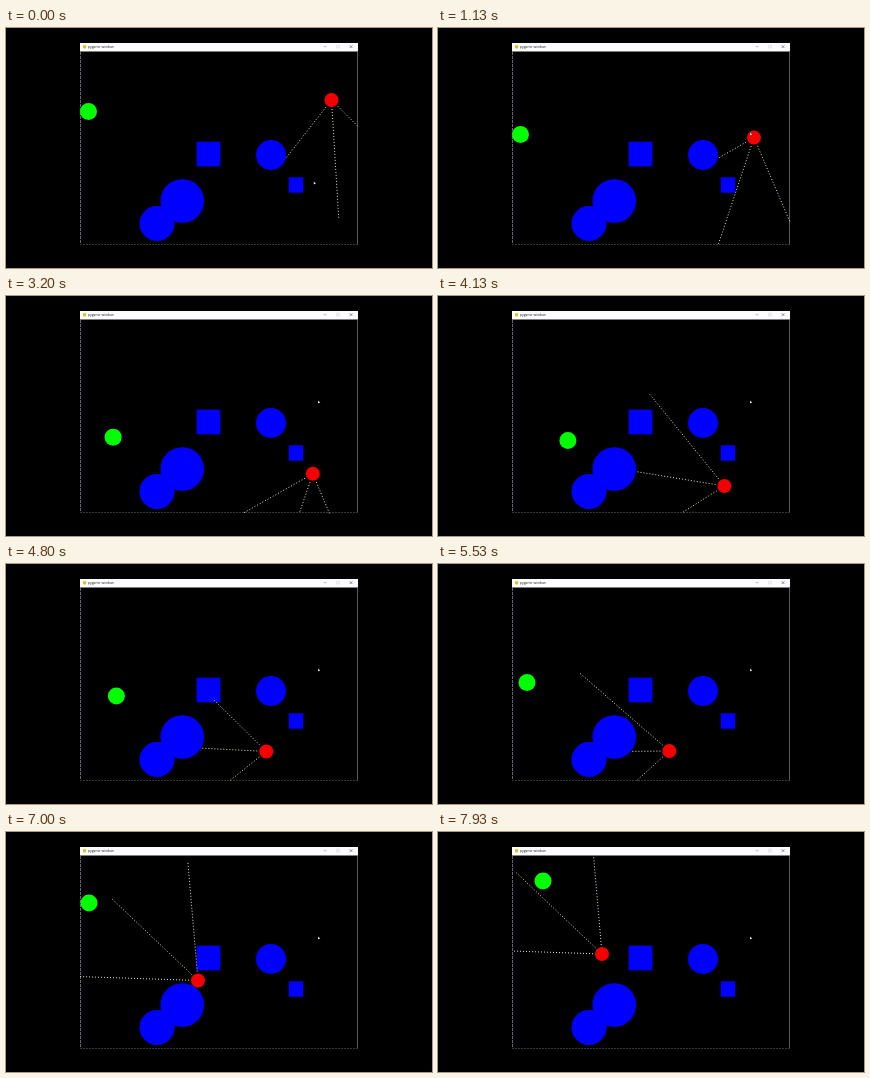
Recreate the animation shown at these times as an HTML page. Size 426 by 240 pixels, loop 8000 ms.

```html
<!DOCTYPE html>
<html lang="en">
<head>
<meta charset="utf-8">
<title>Ray sensors</title>
<style>
html, body { margin: 0; width: 100%; height: 100%; overflow: hidden; background: #000; }
svg { display: block; width: 100vw; height: 100vh; }
text { font: 3.4px "Open Sans", sans-serif; fill: #222; }
</style>
</head>
<body>
<svg viewBox="0 0 426 240">
  <rect width="426" height="240" fill="#000"/>
  <g fill="none" stroke-width="1">
    <path d="M74.5 24V216" stroke="#666680" stroke-dasharray="3 1"/>
    <path d="M351.5 24V216" stroke="#5c5c60"/>
    <path d="M74 216.5H352" stroke="#38382a" stroke-dasharray="2 1"/>
  </g>
  <rect x="74" y="15" width="278" height="8.5" fill="#fcfcff"/>
  <rect x="77" y="17.2" width="3.2" height="3.2" fill="#d8c428"/>
  <text x="82" y="19.8">pygame window</text>
  <g fill="none" stroke-width=".5">
    <path d="M317.7 18.7h2.8" stroke="#777"/>
    <path d="M330.7 17.3h2.7v2.7h-2.7z" stroke="#ccc"/>
    <path d="M343.8 17.4l2.6 2.6m0-2.6l-2.6 2.6" stroke="#333"/>
  </g>
  <g id="blocks" fill="#00f"></g>
  <path id="rays" fill="none" stroke="#e8e8b8" stroke-width="1" stroke-dasharray="1 2"/>
  <circle id="green" r="8.5" fill="#0f0"/>
  <circle id="red" r="7" fill="#f40000"/>
  <path id="mouse" d="M-.8-1.2L1.5 .6L.4 .8L-.6 1.6z" fill="#fff"/>
</svg>
<script>
const LOOP = 8000, FPS = 15;
const SPEED = 36; // red robot, px per second
const SPREAD = 41.6, NEAR = 9, REACH = 117, STEP = 3;
const $ = id => document.getElementById(id);
const rad = deg => deg * Math.PI / 180;
const mix = (a, b, k) => a + (b - a) * k;

const discs = [[265, 127, 15], [176.3, 173, 21.8], [151, 195.5, 17.5]];
const boxes = [[190.7, 113.7, 23.7, 24.6], [282.8, 149.3, 14.4, 15.4]];

// Waypoints: seconds, red place and heading, green place
const waypoints = [
  [0, 325.5, 72, 86.5, 82.5, 83.5],
  [1.13, 316, 109.5, 108.3, 82.5, 106.5],
  [2.2, 306, 144, 74.5, 82.5, 137.5],
  [4.13, 286.5, 190, 189.3, 130, 144.5],
  [5.53, 231.5, 187, 179, 89, 118.5],
  [7, 192, 148.5, 223.5, 83, 71],
  [7.93, 164, 122, 223.5, 105, 49]
].map(([t, x, y, deg, gx, gy]) => ({
  t, gx, gy, x, y, vx: SPEED * Math.cos(rad(deg)), vy: SPEED * Math.sin(rad(deg))
}));

// Cubic Hermite value and slope over a span of T seconds
function hermite(p, v, q, w, T, k) {
  const a = v * T, b = w * T, d = q - p;
  const c2 = 3 * d - 2 * a - b, c3 = a + b - 2 * d;
  return [p + k * (a + k * (c2 + k * c3)), a + k * (2 * c2 + 3 * k * c3)];
}

function blocked(x, y) {
  const inset = 1.5;
  return x < 74.5 || x > 352 || y < 24 || y > 217 ||
    discs.some(([cx, cy, r]) => Math.hypot(x - cx, y - cy) < r) ||
    boxes.some(([bx, by, w, h]) =>
      x > bx + inset && x < bx + w - inset && y > by + inset && y < by + h - inset);
}

function ray(x, y, angle) {
  const c = Math.cos(angle), s = Math.sin(angle);
  let d = NEAR;
  while (d <= REACH && !blocked(x + c * d, y + s * d)) d += STEP;
  if (d === NEAR) return "";
  const end = d - STEP + 1;
  return `M${x + c * NEAR} ${y + s * NEAR}L${x + c * end} ${y + s * end}`;
}

function place(id, x, y) {
  $(id).setAttribute("transform", `translate(${x} ${y})`);
}

function draw(t) {
  const i = Math.max(1, waypoints.findIndex(p => p.t >= t));
  const a = waypoints[i - 1], b = waypoints[i], T = b.t - a.t, k = Math.min(1, (t - a.t) / T);
  const [x, dx] = hermite(a.x, a.vx, b.x, b.vx, T, k);
  const [y, dy] = hermite(a.y, a.vy, b.y, b.vy, T, k);
  const heading = Math.atan2(dy, dx);
  place("red", x, y);
  place("green", mix(a.gx, b.gx, k), mix(a.gy, b.gy, k));

  const m = Math.min(1, t), ease = m * m * (3 - 2 * m);
  place("mouse", mix(308.5, 312.8, ease), mix(155, 106, ease));

  $("rays").setAttribute("d", [-1, 0, 1].map(n => ray(x, y, heading + n * rad(SPREAD))).join(""));
}

$("blocks").innerHTML =
  discs.map(([x, y, r]) => `<circle cx="${x}" cy="${y}" r="${r}"/>`).join("") +
  boxes.map(([x, y, w, h]) => `<rect x="${x}" y="${y}" width="${w}" height="${h}"/>`).join("");

const start = performance.now();
function tick() {
  const t = (performance.now() - start) % LOOP;
  const step = Math.floor(t * FPS / 1000 + 0.06);
  draw(Math.min(step / FPS, waypoints.at(-1).t));
  requestAnimationFrame(tick);
}
tick();
</script>
</body>
</html>
```
